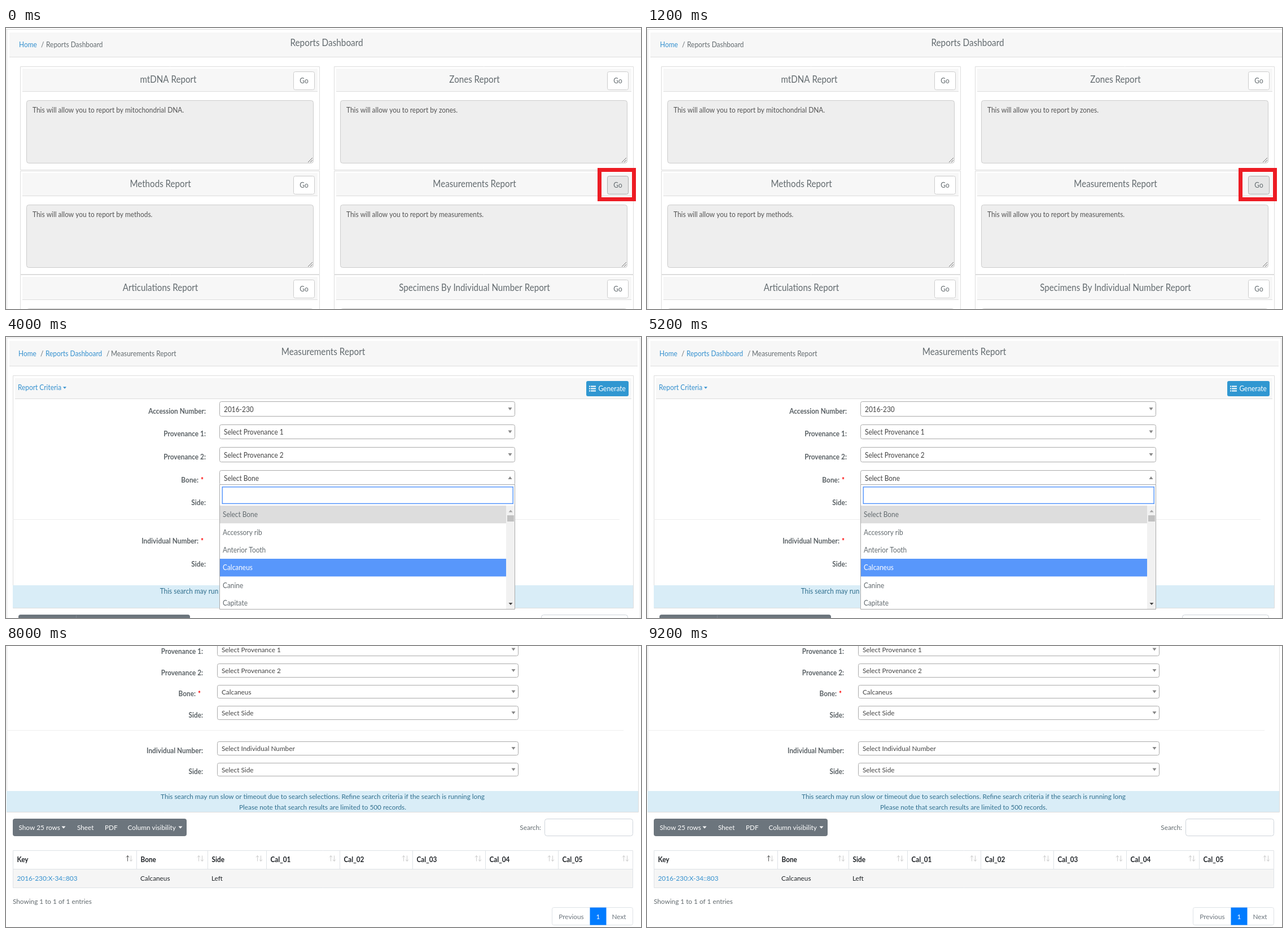
Animation, 1125 px wide and 498 px high, one loop 10000 ms. Source, as an HTML page with a canvas:

```html
<!DOCTYPE html>
<html lang="en">
<head>
<meta charset="utf-8">
<title>Measurements report walkthrough</title>
<style>
  html, body { margin: 0; width: 100%; height: 100%; overflow: hidden; background: #fff; }
  canvas { display: block; }
</style>
</head>
<body>
<canvas id="stage" width="1125" height="498"></canvas>
<script>
const ctx = document.getElementById('stage').getContext('2d');
const LINK = '#3490cf', BODY = '#636b6f', BLUE = '#5897fb', RED = '#ed1c24', RULE = '#ddd', PALE = '#f7f7f7';

// Each screen has its own horizontal and vertical zoom, which applies to all its text.
let zoomX = 1, zoomY = 1;

// y is the middle of the capital letters
function text(str, x, y, { color = BODY, size = 14, align = 'left', weight = 400 } = {}) {
  ctx.save();
  ctx.translate(x, y);
  ctx.scale(zoomX, zoomY);
  ctx.font = `${weight} ${size}px Lato, sans-serif`;
  ctx.textAlign = align;
  ctx.fillStyle = color;
  ctx.fillText(str, 0, size * 0.36);
  ctx.restore();
}

function fill(x0, y0, x1, y1, color) {
  ctx.fillStyle = color;
  ctx.fillRect(x0, y0, x1 - x0, y1 - y0);
}

const hLine = (x0, x1, y, color = RULE) => fill(x0, y, x1, y + 1, color);
const vLine = (x, y0, y1, color = RULE) => fill(x, y0, x + 1, y1, color);

// The border lies inside the given edges
function box(x0, y0, x1, y1, { bg, border, radius = 0, width = border ? 1 : 0 } = {}) {
  ctx.beginPath();
  ctx.roundRect(x0 + width / 2, y0 + width / 2, x1 - x0 - width, y1 - y0 - width, radius);
  if (bg) { ctx.fillStyle = bg; ctx.fill(); }
  if (border) { ctx.strokeStyle = border; ctx.lineWidth = width; ctx.stroke(); }
}

// Triangle centred on x, y; a negative height points up
function caret(x, y, color = '#888', width = 7, height = 5) {
  ctx.beginPath();
  ctx.moveTo(x - width / 2, y - height / 2);
  ctx.lineTo(x + width / 2, y - height / 2);
  ctx.lineTo(x, y + height / 2);
  ctx.fillStyle = color;
  ctx.fill();
}

function stroke(points, color, width = 1) {
  ctx.beginPath();
  points.forEach(([x, y]) => ctx.lineTo(x, y));
  ctx.strokeStyle = color;
  ctx.lineWidth = width;
  ctx.stroke();
}

const redFrame = (x0, y0, x1, y1) => box(x0, y0, x1, y1, { border: RED, width: 7 });

function goButton(x, y, active) {
  box(x, y, x + 38, y + 33, { bg: active ? '#e6e6e6' : '#fff', border: active ? '#adadad' : '#ccc', radius: 3 });
  text('Go', x + 19, y + 16.5, { align: 'center' });
}

function reportPanel(x, y, title, titleX, note, active) {
  box(x, y, x + 531, y + 184, { bg: '#fff', border: RULE });
  fill(x + 4, y + 4, x + 527, y + 44, PALE);
  hLine(x + 4, x + 527, y + 44);
  text(title, titleX, y + 22.5, { size: 17.8, align: 'center' });
  goButton(x + 484, y + 9, active);
  const right = x + 520, bottom = y + 172;
  box(x + 11, y + 60, right, bottom, { bg: '#eee', border: '#ccc', radius: 4 });
  text(note, x + 22, y + 77, { color: '#555' });
  for (const d of [8, 4]) stroke([[right - 2 - d, bottom - 2], [right - 2, bottom - 2 - d]], '#777');
}

function dashboard() {
  zoomX = 0.852; zoomY = 0.95;
  hLine(0, 1125, 2);
  vLine(1, 3, 498);
  fill(6, 8, 1125, 51, PALE);
  hLine(6, 1125, 51);
  text('Home', 23, 29.5, { color: LINK });
  text('/', 62, 29.5);
  text('Reports Dashboard', 71, 29.5);
  text('Reports Dashboard', 568, 26, { size: 18, align: 'center' });
  const note = 'This will allow you to report by ';
  reportPanel(25, 68, 'mtDNA Report', 287.5, note + 'mitochondrial DNA.');
  reportPanel(581, 68, 'Zones Report', 830, note + 'zones.');
  reportPanel(25, 253, 'Methods Report', 273.5, note + 'methods.');
  reportPanel(581, 253, 'Measurements Report', 830, note + 'measurements.', true);
  reportPanel(25, 437, 'Articulations Report', 273.5, '');
  reportPanel(581, 437, 'Specimens By Individual Number Report', 830, '');
  redFrame(1048, 248, 1116, 307);
}

function pageHeader({ left, right, top, bottom, crumbs, crumbY, titleX, titleY }) {
  fill(left, top, right, bottom, PALE);
  hLine(left, right, bottom);
  const [home, slash1, reports, slash2, current] = crumbs;
  text('Home', home, crumbY, { color: LINK });
  text('/', slash1, crumbY);
  text('Reports Dashboard', reports, crumbY, { color: LINK });
  text('/', slash2, crumbY);
  text('Measurements Report', current, crumbY);
  text('Measurements Report', titleX, titleY, { size: 18, align: 'center' });
}

function criteriaPanel(left, right, top, bottom, buttonX, buttonY) {
  box(left, top, right, bottom, { border: RULE });
  fill(left + 4, top + 5, right - 4, top + 41, PALE);
  hLine(left + 4, right - 4, top + 41);
  text('Report Criteria', left + 9, top + 21, { color: LINK });
  caret(left + 92, top + 22, LINK, 6, 3.5);
  box(buttonX, buttonY, buttonX + 75, buttonY + 27, { bg: '#3097d1', radius: 3 });
  for (const dy of [8.5, 12.5, 16.5]) {
    fill(buttonX + 5, buttonY + dy, buttonX + 7, buttonY + dy + 2, '#fff');
    fill(buttonX + 8, buttonY + dy, buttonX + 17, buttonY + dy + 2, '#fff');
  }
  text('Generate', buttonX + 21.5, buttonY + 13.5, { color: '#fff' });
}

function label(str, right, y, required) {
  text(str, right - (required ? 13 : 0), y, { align: 'right', weight: 700, color: '#5b6266' });
  if (required) text('*', right - 9, y, { color: 'red', weight: 700 });
}

function select(str, left, right, y, { focus, open } = {}) {
  const half = 14 * zoomY;
  box(left, Math.round(y - half), right, Math.round(y + half), {
    bg: '#fff', border: focus ? BLUE : '#aaa', radius: 3, width: focus ? 1.5 : 1
  });
  text(str, left + 8, y + 0.5, { color: '#444' });
  caret(right - 9, y, '#888', 7, open ? -5 : 5);
}

// Rows are [label, value, y, options]; labels sit slightly below the middle of their box.
function form(left, right, labelX, rows) {
  for (const [name, value, y, options = {}] of rows) {
    label(name, labelX, y + 3.7, options.required);
    select(value, left, right, y, options);
  }
}

function notice(left, right, top, bottom, center, y1, y2) {
  fill(left, top, right, bottom, '#d9edf7');
  const style = { color: '#31708f', align: 'center' };
  text('This search may run slow or timeout due to search selections. Refine search criteria if the search is running long', center, y1, style);
  text('Please note that search results are limited to 500 records.', center, y2, style);
}

function dropdown({ left, right, top, bottom, list, pitch, options, active, muted, thumb, cursor }) {
  box(left, top, right, bottom, { bg: '#fff', border: '#aaa' });
  box(left + 4.5, top + 4, right - 3, top + 35, { bg: '#fff', border: BLUE, width: 1.5 });
  if (cursor) vLine(left + 8, top + 11, top + 28, '#333');
  const trackX = right - 16;
  options.forEach((name, i) => {
    const y = list + i * pitch;
    if (i === active || i === muted)
      fill(left + 1, y - pitch / 2, trackX, y + pitch / 2, i === active ? BLUE : '#ddd');
    text(name, left + 6, y, { color: i === active ? '#fff' : BODY });
  });
  fill(trackX, list - pitch / 2, right - 1, bottom - 1, '#f1f1f1');
  fill(trackX + 2, thumb[0], right - 2, thumb[1], '#c1c1c1');
  caret(right - 8, list - 6, '#a3a3a3', 7, -4);
  caret(right - 8, bottom - 10, '#444', 7, 4);
}

function chooseAccession() {
  zoomX = 0.847; zoomY = 0.963;
  hLine(0, 1125, 0, '#444');
  box(4, 6, 1124, 520, { border: RULE });
  pageHeader({ left: 9, right: 1120, top: 11, bottom: 55, crumbs: [25, 63, 73, 180, 189], crumbY: 33, titleX: 563.5, titleY: 29 });
  criteriaPanel(15, 1113, 73, 495, 1030, 83);
  hLine(15, 1088, 333, '#eee');
  form(381, 904, 356, [
    ['Accession Number:', '2016-230', 133.5, { open: true }],
    ['Provenance 1:', 'Select Provenance 1', 175],
    ['Provenance 2:', 'Select Provenance 2', 216],
    ['Bone:', 'Select Bone', 257.5, { required: true }],
    ['Side:', 'Select Side', 299],
    ['Individual Number:', 'Select Individual Number', 368, { required: true }],
    ['Side:', 'Select Side', 409.5]
  ]);
  notice(15, 1112, 452, 494, 564, 462.5, 483);
  dropdown({
    left: 381, right: 904, top: 145, bottom: 372, list: 200, pitch: 32, active: 1, thumb: [201, 218], cursor: true,
    options: ['Select Accession Number', '2016-230', '2016-231', '2016-232', '2016-233', '2016-234']
  });
}

function chooseBone() {
  zoomX = 0.849; zoomY = 0.949;
  box(1, 1, 1124, 520, { border: RULE });
  pageHeader({ left: 6, right: 1119, top: 7, bottom: 51, crumbs: [22, 61, 70, 178, 186], crumbY: 29, titleX: 562, titleY: 25.5 });
  criteriaPanel(12, 1112, 68, 481, 1028, 78);
  hLine(12, 1087, 323, '#eee');
  form(378, 902, 354, [
    ['Accession Number:', '2016-230', 127.5],
    ['Provenance 1:', 'Select Provenance 1', 168],
    ['Provenance 2:', 'Select Provenance 2', 208.5],
    ['Bone:', 'Select Bone', 249.5, { required: true, open: true }],
    ['Side:', 'Select Side', 290],
    ['Individual Number:', 'Select Individual Number', 358, { required: true }],
    ['Side:', 'Select Side', 399]
  ]);
  notice(12, 1111, 440, 480, 562, 450.5, 471);
  dropdown({
    left: 378, right: 902, top: 261, bottom: 483, list: 314.5, pitch: 31.4, active: 3, muted: 0, thumb: [316, 327],
    options: ['Select Bone', 'Accessory rib', 'Anterior Tooth', 'Calcaneus', 'Canine', 'Capitate']
  });
  box(22, 492, 326, 520, { bg: '#6c757d', radius: 4 });
  vLine(124, 493, 498, '#7d858c');
  box(948, 492, 1102, 520, { border: '#ced4da', radius: 4 });
}

function generate() {
  zoomX = 0.852; zoomY = 0.958;
  hLine(2, 1125, 2);
  vLine(2, 2, 498);
  pageHeader({ left: 7, right: 1125, top: 8, bottom: 52, crumbs: [24, 63, 72, 180, 188], crumbY: 30, titleX: 565, titleY: 26.5 });
  criteriaPanel(13, 1117, 70, 489, 1033, 80);
  hLine(13, 1092, 329, '#eee');
  form(381, 908, 356, [
    ['Accession Number:', '2016-230', 130],
    ['Provenance 1:', 'Select Provenance 1', 171],
    ['Provenance 2:', 'Select Provenance 2', 212.5],
    ['Bone:', 'Calcaneus', 253.5, { required: true, focus: true }],
    ['Side:', 'Select Side', 295],
    ['Individual Number:', 'Select Individual Number', 364],
    ['Side:', 'Select Side', 405]
  ]);
  notice(13, 1116, 447, 488, 565.5, 458, 478.5);
  redFrame(1024, 70, 1123, 121);
}

function sortArrows(x, y, active) {
  for (const [dx, dir] of [[0, 1], [6, -1]]) {
    const color = active && dir === 1 ? '#555' : '#ccc', tip = y - 5 * dir;
    stroke([[x + dx, y + 5 * dir], [x + dx, tip]], color);
    stroke([[x + dx - 2.5, tip + 3 * dir], [x + dx, tip], [x + dx + 2.5, tip + 3 * dir]], color);
  }
}

function results() {
  const ink = '#212529', edge = '#dee2e6', white = { color: '#fff' };
  zoomX = 0.842; zoomY = 0.875;
  box(1, -20, 1121, 295, { border: RULE });
  hLine(1, 1094, 149, '#eee');
  form(374, 908, 349, [
    ['Provenance 1:', 'Select Provenance 1', 6],
    ['Provenance 2:', 'Select Provenance 2', 43.5],
    ['Bone:', 'Calcaneus', 81, { required: true }],
    ['Side:', 'Select Side', 118.5],
    ['Individual Number:', 'Select Individual Number', 181.5],
    ['Side:', 'Select Side', 219]
  ]);
  notice(1, 1120, 257, 294, 561, 267, 286);

  box(12, 306, 320, 337, { bg: '#6c757d', radius: 4 });
  text('Show 25 rows', 22.5, 322, white);
  caret(102, 321.5, '#fff', 7, 4);
  text('Sheet', 126, 322, white);
  text('PDF', 175, 322, white);
  text('Column visibility', 215.5, 322, white);
  caret(309, 321.5, '#fff', 7, 4);
  text('Search:', 948, 321.5, { align: 'right' });
  box(954, 306, 1111, 337, { bg: '#fff', border: '#ced4da', radius: 4 });

  fill(12, 396, 1110, 429, '#f5f5f5');
  box(12, 362, 1111, 429, { border: edge });
  hLine(12, 1110, 395, edge);
  const columns = [12, 231, 357, 461, 591, 720, 849, 978, 1110];
  ['Key', 'Bone', 'Side', 'Cal_01', 'Cal_02', 'Cal_03', 'Cal_04', 'Cal_05'].forEach((name, i) => {
    if (i) vLine(columns[i], 362, 395, edge);
    text(name, columns[i] + 7.5, 379, { weight: 700, color: ink });
    sortArrows(columns[i + 1] - 15.5, 376.5, i === 0);
  });
  text('2016-230:X-34::803', 19.5, 412, { color: LINK });
  text('Calcaneus', 238, 412, { color: ink });
  text('Left', 364, 412, { color: ink });
  text('Showing 1 to 1 of 1 entries', 12, 453);

  box(967, 463, 1111, 495, { bg: '#fff', border: edge, radius: 3 });
  fill(1034.5, 463.5, 1063.5, 494.5, '#007bff');
  const centered = { align: 'center', color: '#6c757d' };
  text('Previous', 1001.5, 479.5, centered);
  text('1', 1049, 479.5, { ...centered, color: '#fff' });
  text('Next', 1086, 479.5, centered);
}

const screens = [dashboard, chooseAccession, chooseBone, generate, results];
const SCREEN_MS = 2000;

function draw() {
  fill(0, 0, 1125, 498, '#fff');
  screens[Math.floor(performance.now() / SCREEN_MS) % screens.length]();
  requestAnimationFrame(draw);
}
draw();
</script>
</body>
</html>
```
